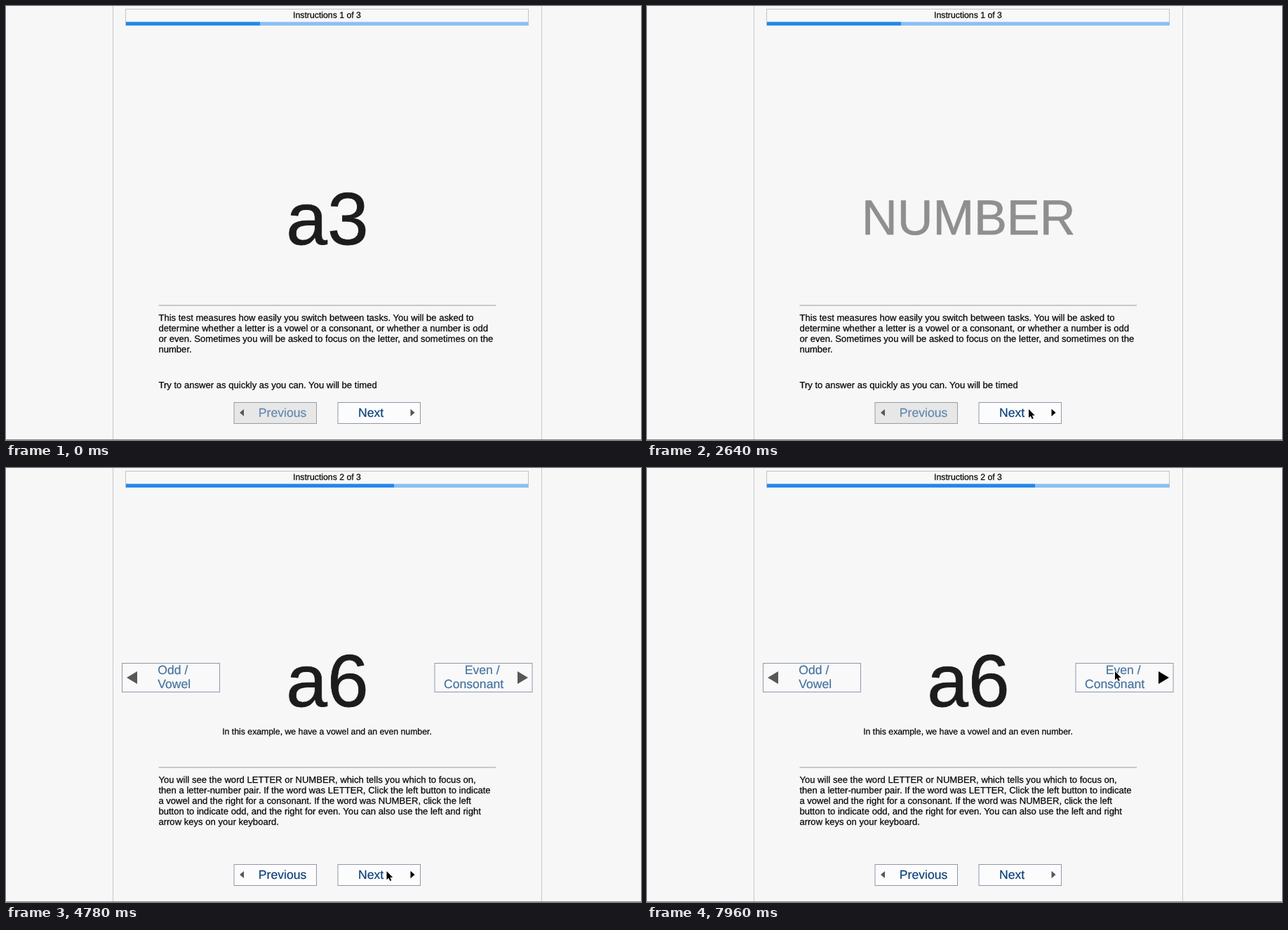
Write an HTML page that moves like this. It is 905 px wide and 619 px high and loops after 8000 ms.

```html
<!DOCTYPE html>
<html lang="en">
<head>
<meta charset="utf-8">
<title>Task switching instructions</title>
<style>
  html, body { margin: 0; width: 100%; height: 100%; overflow: hidden; background: #f7f7f7; }
  svg { display: block; width: 905px; height: 619px; font-family: "Liberation Sans", Arial, sans-serif; }
  text { white-space: pre; text-rendering: geometricPrecision; }
  .mid { text-anchor: middle; }
  .small, .body { fill: #080808; stroke: #080808; stroke-width: .25px; }
  .small { font-size: 12.28px; }
  .body { font-size: 13.08px; }
  .big { font-size: 105.6px; fill: #1c1c1c; stroke: #1c1c1c; stroke-width: .8px; }
  .word { font-size: 70.3px; fill: #8f8f8f; stroke: #8f8f8f; stroke-width: .7px; }
  .label { font-size: 17.6px; fill: #0b4079; stroke: #0b4079; stroke-width: .2px; }
  .side { fill: #45739f; stroke: #45739f; }
  .box { fill: #fcfcfc; stroke: #8f97ab; }
  .pale { fill: #f9f9fa; }
  .arrow { fill: #575757; }
  .arrow.hot { fill: #000; }
  .off .box { fill: #e7e7e7; stroke: #999ca5; }
  .off .label { fill: #6188ae; stroke: #6188ae; }
</style>
</head>
<body>
<svg viewBox="0 0 905 619">
  <path d="M152.5 0V618M763.5 0V618" stroke="#c9c9c9"/>
  <path d="M0 618.5H905" stroke="#858585"/>
  <rect x="170.5" y="4.5" width="574" height="23" fill="#f8f8f8" stroke="#c4c4c4"/>
  <rect x="171" y="22.7" width="573.5" height="5" fill="#86c0f6"/>
  <rect id="bar" x="171" y="22.7" height="5" fill="#2187ea"/>
  <text id="title" class="small mid" x="457.5" y="17"></text>
  <rect x="217.5" y="426" width="480.5" height="2" fill="#c8c8c8"/>

  <g id="page1">
    <text id="pair" class="big mid" x="457.9" y="340">a3</text>
    <text id="word" class="word mid" x="458.2" y="326.4">NUMBER</text>
  </g>

  <g id="page2">
    <text class="big mid" x="457.9" y="340">a6</text>
    <text class="small mid" x="457.5" y="380">In this example, we have a vowel and an even number.</text>
    <rect class="box pale" x="165.5" y="278.5" width="139" height="41"/>
    <path class="arrow" d="M172 299L187 290V308Z"/>
    <text class="label side" x="216.3" y="294.3">Odd /</text>
    <text class="label side" x="216.3" y="314.3">Vowel</text>
    <rect class="box pale" x="611" y="278.5" width="139" height="41"/>
    <path id="evenArrow" class="arrow" d="M744 299L729 290V308Z"/>
    <text class="label side" x="653.7" y="294.3">Even /</text>
    <text class="label side" x="624" y="314.3">Consonant</text>
  </g>

  <g id="prev">
    <rect class="box" x="325" y="565.5" width="117.5" height="30"/>
    <path class="arrow" d="M333 580L339 575V585Z"/>
    <text class="label" x="359.8" y="586">Previous</text>
  </g>
  <rect class="box" x="473" y="565.5" width="117.5" height="30"/>
  <path id="nextArrow" class="arrow" d="M582.5 580L576.5 574.7V585.3Z"/>
  <text class="label" x="502" y="586">Next</text>

  <path id="cursor" d="M0 0V12.2L2.8 9.7L4.8 14L6.8 13.2L4.9 8.9H8.7Z"
    fill="#000" stroke="#fff" stroke-width="1.4" stroke-linejoin="round" paint-order="stroke"/>
</svg>
<script>
const LOOP = 8000, ENTER = 20, WORD_AT = 1400, PAGE_AT = 3820;
const $ = id => document.getElementById(id);
const svg = document.querySelector("svg");

const copy = {
  page1: [
    [448.8, "This test measures how easily you switch between tasks. You will be asked to"],
    [463.8, "determine whether a letter is a vowel or a consonant, or whether a number is odd"],
    [478.8, "or even. Sometimes you will be asked to focus on the letter, and sometimes on the"],
    [493.8, "number."],
    [545, "Try to answer as quickly as you can. You will be timed"]
  ],
  page2: [
    [448.8, "You will see the word LETTER or NUMBER, which tells you which to focus on,"],
    [463.8, "then a letter-number pair. If the word was LETTER, Click the left button to indicate"],
    [478.8, "a vowel and the right for a consonant. If the word was NUMBER, click the left"],
    [493.8, "button to indicate odd, and the right for even. You can also use the left and right"],
    [508.8, "arrow keys on your keyboard."]
  ]
};

for (const [page, lines] of Object.entries(copy)) {
  for (const [y, line] of lines) {
    const el = document.createElementNS(svg.namespaceURI, "text");
    el.setAttribute("class", "body");
    el.setAttribute("x", 217.4);
    el.setAttribute("y", y);
    el.textContent = line;
    $(page).append(el);
  }
}

// Pointer stops: time, x, y
const path = [
  [20, 822, 612], [680, 585, 560], [1000, 583, 559], [1140, 583, 559],
  [1660, 563.5, 555], [1960, 560, 557], [2600, 544, 575], [3520, 543.5, 575],
  [4300, 542.5, 575], [5500, 542.5, 575], [6040, 547, 528], [6140, 547.5, 527],
  [6700, 619, 374], [6880, 656, 302], [6980, 662, 293], [7300, 666, 290], [8000, 667, 290]
];

function pointer(t) {
  let i = 0;
  while (i < path.length - 2 && t >= path[i + 1][0]) i++;
  const [t0, x0, y0] = path[i], [t1, x1, y1] = path[i + 1];
  const k = Math.max(0, Math.min(1, (t - t0) / (t1 - t0)));
  const e = k * k * (3 - 2 * k);
  return [x0 + (x1 - x0) * e, y0 + (y1 - y0) * e];
}

const inside = (x, y, l, t, r, b) => x >= l && x <= r && y >= t && y <= b;
const show = (id, on) => $(id).style.display = on ? "" : "none";

function draw(t) {
  const second = t >= PAGE_AT;
  const [x, y] = pointer(t);
  show("page1", !second);
  show("page2", second);
  show("pair", t < WORD_AT);
  show("word", t >= WORD_AT);
  show("cursor", t >= ENTER);
  $("title").textContent = `Instructions ${second ? 2 : 1} of 3`;
  $("bar").setAttribute("width", second ? 382 : 191);
  $("prev").classList.toggle("off", !second);
  $("nextArrow").classList.toggle("hot", t >= ENTER && inside(x, y, 472, 565, 591, 596));
  $("evenArrow").classList.toggle("hot", second && inside(x, y, 610, 278, 750, 320));
  $("cursor").setAttribute("transform", `translate(${x} ${y})`);
}

const start = performance.now();
function tick() {
  draw((performance.now() - start) % LOOP);
  requestAnimationFrame(tick);
}
tick();
</script>
</body>
</html>
```
